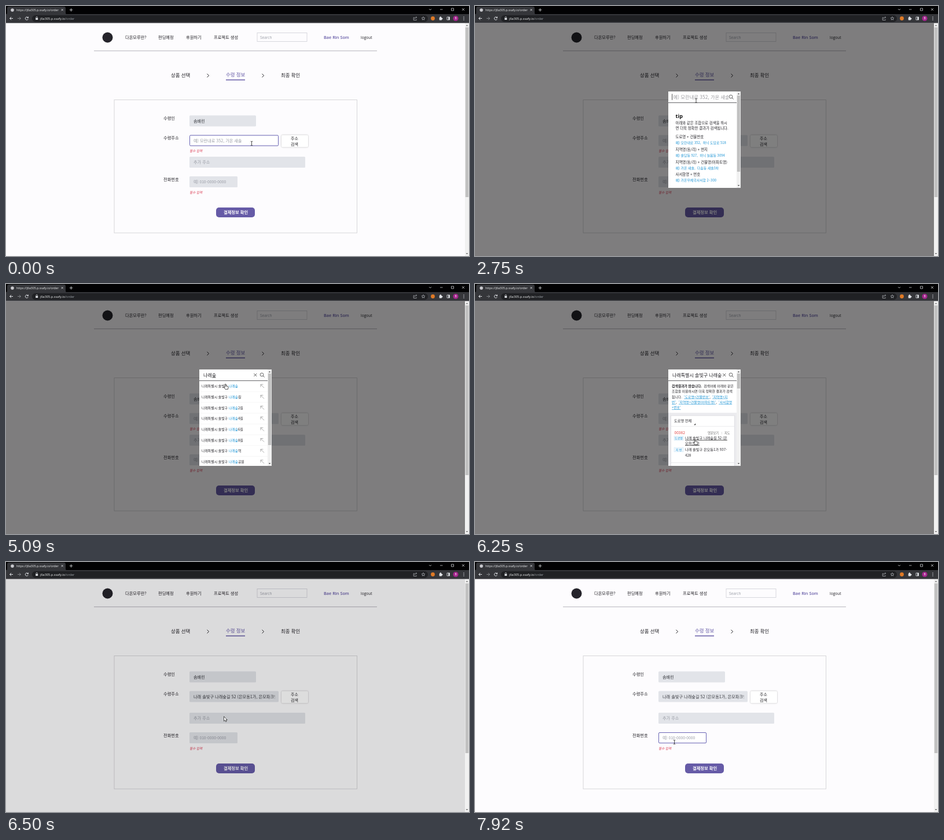
These frames come from a looping animation (800 px wide and 433 px high, 8 s). An HTML page:

```html
<!DOCTYPE html>
<html lang="ko">
<head>
<meta charset="utf-8">
<title>Order form</title>
<style>
html, body { margin: 0; width: 100%; height: 100%; overflow: hidden; background: #fdfcfe; }
svg { display: block; width: 100vw; height: 100vh; }
text { font-family: "Open Sans", "Noto Sans CJK KR", "Noto Sans CJK", sans-serif; white-space: pre; }
.ko { font-family: "Noto Sans CJK KR", "Noto Sans CJK", "Noto Sans", sans-serif; }
</style>
</head>
<body>
<svg id="stage" viewBox="0 0 800 433" preserveAspectRatio="none"></svg>
<script>
const LOOP = 8000;
const PURPLE = '#665ba7', BLUE = '#1a93d4', RED = '#d8324a', HINT = '#9a9da6', INK = '#222126';

// y is the vertical middle of the line
const label = (x, y, s, size, fill, extra, cls) =>
  `<text x="${x}" y="${(y + size * .36).toFixed(2)}" font-size="${size}" fill="${fill}" class="${cls}" ${extra}>${s}</text>`;
const ko = (x, y, s, size = 7.25, fill = INK, extra = '') => label(x, y, s, size, fill, extra, 'ko');
const latin = (x, y, s, size, fill, extra = '') => label(x, y, s, size, fill, extra, '');
const box = (x, y, w, h, fill, extra = '') =>
  `<rect x="${x}" y="${y}" width="${w}" height="${h}" fill="${fill}" ${extra}/>`;
const line = (d, color, w = 1, extra = '') =>
  `<path d="${d}" fill="none" stroke="${color}" stroke-width="${w}" ${extra}/>`;
const dot = (x, y, r, fill) => `<circle cx="${x}" cy="${y}" r="${r}" fill="${fill}"/>`;
const group = (id, content, extra = '') => `<g id="${id}" ${extra}>${content}</g>`;
const field = (y, w) => box(317, y, w, 19, '#e2e4e9', 'rx="1.5"');
const focused = (id, y, w) => group(id, box(317.5, y + .5, w - 1, 18, '#fff', 'rx="1.5" stroke="#6a64b5"'));
const magnifier = (x, y) => dot(x, y, 2.9, 'none').replace('/>', ' stroke="#444" stroke-width=".8"/>') +
  line(`M${x + 2} ${y + 2}l2.6 2.6`, '#444', .9);

function browser() {
  const w = '#dfe1e5';
  return box(0, 0, 800, 14, '#020203') + box(0, 14, 800, 15.5, '#35363a') +
    line('M0 14.5Q2 14 2 12V4Q2 1 5 1H100Q103 1 103 4V12Q103 14 105 14.5Z', 'none').replace('fill="none"', 'fill="#35363a"') +
    dot(11, 7, 2.8, '#c9c9ce') +
    latin(18, 6.8, 'https://j6a305.p.ssafy.io/order', 5.2, '#f1f3f4') +
    line('M95.5 5l3.4 3.4m0-3.4l-3.4 3.4M109.7 6.8h5.6m-2.8-2.8v5.6', w, .8) +
    line('M731 5l2 2 2-2M750 6h4.5M769.5 4h4v4h-4zM788 4l4 4m0-4l-4 4', w, .7) +
    box(45, 16, 684, 11.5, '#202124', 'rx="5.7"') +
    line('M12 21.5H6.5m2.6-2.6l-2.6 2.6 2.6 2.6', w) +
    line('M20 21.5h5.5m-2.6-2.6l2.6 2.6-2.6 2.6', '#818488') +
    line('M38 20a2.6 2.6 0 1 0 .3 2.6M38.4 18.5v2.1h-2.1', w) +
    box(51.2, 20.7, 4, 3.2, w) + line('M52 20.8v-1.2a1.2 1.2 0 0 1 2.4 0v1.2', w, .7) +
    latin(59, 21.5, 'j6a305.p.ssafy.io<tspan fill="#9aa0a6">/order</tspan>', 5.6, '#f1f3f4') +
    line('M706 20h-1.8v4.5h5v-1.5M705.8 22.3q.4-2.6 3.8-2.6m-1.3-1.4l1.5 1.4-1.5 1.4', '#bdc1c6', .7) +
    line('M721 18.6l.9 1.9 2 .2-1.5 1.4.4 2-1.8-1-1.8 1 .4-2-1.5-1.4 2-.2z', '#bdc1c6', .7) +
    dot(737.5, 21.5, 3.4, '#e07a26') +
    box(748.7, 19.8, 4.3, 4.6, w, 'rx=".6"') + dot(750.8, 19.4, 1.2, w) + dot(753.3, 22, 1.2, w) +
    line('M762 19h4.5v5H762z', w, .8) + box(764.3, 19, 2.2, 5, w) +
    dot(777, 21.5, 4.6, '#a3248c') + latin(777, 21.4, 'B', 5, '#fff', 'text-anchor="middle"') +
    [19, 21.5, 24].map(y => dot(791, y, .7, w)).join('');
}

function page() {
  const button = 'rx="2" style="filter:drop-shadow(0 .8px .8px rgba(0,0,0,.3))"';
  return box(0, 29.5, 800, 404, '#fdfcfe') +
    dot(175.5, 54.5, 9, '#25242b') +
    ko(206, 54, '다온모루란?') + ko(263, 54, '펀딩예정') + ko(311, 54, '후원하기') + ko(359, 54, '프로젝트 생성') +
    box(434, 46.5, 86, 15, '#fdfcfe', 'stroke="#cfd0d8" stroke-width=".8"') +
    latin(439, 54.3, 'Search', 6.5, HINT) +
    latin(549, 54, 'Bae Rin Som', 7.3, PURPLE, 'font-weight="600"') + latin(613, 54.3, 'logout', 6.6, INK) +
    line('M152 77.6H641', '#c3c2c8', 1.2) +
    ko(285, 119.7, '상품 선택', 8.4) + ko(380, 119.2, '수령 정보', 8.4, PURPLE) + ko(475, 119.7, '최종 확인', 8.4) +
    line('M380 128H413', PURPLE, 1.5) +
    line('M347.5 117.5l3 3-3 3M442.5 117.5l3 3-3 3', INK, 1) +
    box(187, 162.5, 419.5, 230.5, 'none', 'stroke="#d3d3d6" stroke-width=".9"') +
    ko(272, 194.5, '수령인') + ko(272, 228.5, '수령주소') + ko(272, 300, '전화번호') +
    field(189.5, 115) + ko(324, 199, '솜배린', 7.2, '#35363c') +
    field(223.5, 154) + focused('addressFocus', 223.5, 154) +
    group('addressHint', ko(324, 233, '예) 모란내로 352, 가온 새솔', 7.15, HINT) +
      ko(317, 251, '필수 입력', 5.6, RED, 'font-style="italic"')) +
    group('addressValue', ko(324, 233, '나래 솔빛구 나래숲길 52 (은모동1가, 은모파크빌)', 7.2, '#35363c'), 'clip-path="url(#fieldClip)"') +
    box(476, 223.5, 46, 21, '#fff', button) + ko(492, 229, '주소', 7) + ko(492, 239, '검색', 7) +
    field(261, 200) + ko(324, 270.5, '추가 주소', 7.2, HINT) +
    field(295, 83) + focused('phoneFocus', 295, 83) + ko(324, 304.7, '예) 010-0000-0000', 6.75, HINT) +
    ko(317, 322.5, '필수 입력', 5.6, RED, 'font-style="italic"') +
    box(363, 349, 67, 17, PURPLE, 'rx="5"') + ko(376, 357.5, '결제정보 확인', 7.25, '#fff', 'font-weight="700"');
}

function pageScrollbar() {
  return box(793, 29.5, 7, 404, '#f1f1f1') + box(793.8, 37, 5.4, 294, '#c1c1c1') +
    '<path d="M794.6 34.4l1.9-2 1.9 2zM794.6 428l1.9 2 1.9-2z" fill="#666"/>';
}

function tips() {
  const rows = [
    ['도로명 + 건물번호', '예) 모란내로 352,  하늬 도담로 518'],
    ['지역명(동/리) + 번지', '예) 솔담동 927,  하늬 늘봄동 3094'],
    ['지역명(동/리) + 건물명(아파트명)', '예) 가온 새솔,  다솜동 새솔3차'],
    ['사서함명 + 번호', '예) 가온우체국사서함 2~300']];
  return latin(346.5, 190.5, 'tip', 9, '#111', 'font-weight="700"') +
    ko(346.5, 203, '아래와 같은 조합으로 검색을 하시', 6.4) + ko(346.5, 212, '면 더욱 정확한 결과가 검색됩니다.', 6.4) +
    rows.map(([head, sample], i) => ko(346.5, 227 + i * 21.7, head, 6.45) +
      ko(346.5, 237 + i * 21.7, sample, 5.9, BLUE)).join('');
}

function suggestions(items, match) {
  return items.map((item, i) => {
    const y = 177 + i * 18.7;
    const marked = item.replace(match, `<tspan fill="${BLUE}">${match}</tspan>`);
    return ko(338, y, marked, 5.9) + line(`M334 ${y + 9.3}H452`, '#f0f0f0', .6) +
      line(`M446 ${y + 3}l-6-6m0 4.4v-4.4h4.4`, '#8a8a8a', .7);
  }).join('');
}

function results() {
  const link = s => `<tspan fill="${BLUE}" text-decoration="underline">${s}</tspan>`;
  const tag = (y, s) => box(344, y - 3.8, 16, 7.6, '#eef7fd', 'stroke="#c9e4f5" stroke-width=".5"') +
    ko(352, y, s, 5, BLUE, 'text-anchor="middle"');
  return box(334, 223, 118, 92, '#ececef') + box(338.5, 228, 110, 90, '#fff', 'stroke="#d8d8dc" stroke-width=".7"') +
    ko(340, 177, '<tspan font-weight="700">검색결과가 많습니다.</tspan>  검색어에 아래와 같은', 5.85) +
    ko(340, 186.3, '조합을 이용하시면 더욱 정확한 결과가 검색', 5.85) +
    ko(340, 195.5, `됩니다.  ${link("'도로명+건물번호'")},  ${link("'지역명+지")}`, 5.85) +
    ko(340, 204.8, `${link("번'")},  ${link("'지역명+건물명(아파트명)'")},  ${link("'사서함명")}`, 5.85) +
    ko(340, 214, link("+번호'"), 5.85) +
    ko(344, 237, '도로명 전체', 6.2) + '<path d="M378.3 244.3h2.8v-2.8z" fill="#333"/>' +
    line('M339 246.5H448', '#e6e6e8', .7) +
    ko(344.5, 257.3, '00382', 6.6, '#e0403f') +
    ko(402, 258.3, '영문보기', 5.2, '#666') + line('M426.5 256v4.5', '#ccc', .6) + ko(431, 258.3, '지도', 5.2, '#666') +
    tag(267, '도로명') +
    group('streetLine', ko(363, 267, '나래 솔빛구 나래숲길 52 (은', 6.2) + ko(363, 276, '모파크빌)', 6.2)) +
    tag(287, '지 번') + ko(363, 287, '나래 솔빛구 은모동1가 937-', 6.2) + ko(363, 296.3, '428', 6.2) +
    line('M339 309.5H448', '#e0e0e3', .7);
}

function modal() {
  const town = '나래특별시 도담구';
  const first = ['나래특별시 모루구 새봄동', town,
    ...['가람솔로', '가람솔미래로', '가람로', '거울뫼로', '늘찬동', '다솔동'].map(s => `${town} ${s}`)];
  const second = ['', '길', '2길', '4길', '6길', '8길', '역', '공원'].map(s => `나래특별시 솔빛구 나래숲${s}`);
  return box(334, 148, 125, 167, '#fff') +
    group('tips', tips()) + group('listA', suggestions(first, '나')) +
    group('listB', suggestions(second, '나래숲')) + group('results', results()) +
    line('M334 167.5H452', '#55555a', .9) +
    group('query', ko(341, 157.7, '', 8), 'clip-path="url(#queryClip)"') +
    box(0, 161.7, 7, .6, '#333', 'id="compose"') + box(340, 152.3, .8, 10.5, '#222', 'id="caret"') +
    group('clear', line('M428.3 155l5 5m0-5l-5 5', '#444', .9)) + magnifier(442, 157) +
    box(452, 148, 7, 167, '#f1f1f1') + box(452.8, 155, 5.4, 132, '#c1c1c1', 'id="thumb"') +
    '<path d="M453.7 153l1.8-2 1.8 2zM453.7 310l1.8 2 1.8-2z" fill="#555"/>';
}

const cursors = {
  arrow: '<path d="M0 0V8.2L1.9 6.5 3.2 9.2 4.6 8.6 3.4 6H5.8Z" fill="#fff" stroke="#111" stroke-width=".7"/>',
  beam: line('M-1.7-3.7Q0-3.7 0-2.7Q0-3.7 1.7-3.7M0-3V3M-1.7 3.7Q0 3.7 0 2.7Q0 3.7 1.7 3.7', '#222', .8),
  hand: '<path d="M-1.7-4.5q1.1-1 1.6.2v3l3.4.7q1 .3.8 1.4l-.6 3.5h-4.6l-2.5-3.4q.1-1.2 1.9.1z" fill="#fff" stroke="#111" stroke-width=".7"/>'
};

const stage = document.getElementById('stage');
stage.innerHTML = `<defs><clipPath id="fieldClip">${box(320, 223, 144.5, 20, '#000')}</clipPath>
  <clipPath id="queryClip">${box(336, 149, 102, 17, '#000')}</clipPath>
  <clipPath id="modalClip">${box(334, 148, 125, 167, '#000')}</clipPath></defs>` +
  page() + box(0, 29.5, 793, 404, '#000', 'id="shade"') + pageScrollbar() + browser() +
  group('modal', group('modalBody', modal(), 'clip-path="url(#modalClip)"')) +
  group('cursor', Object.entries(cursors).map(([name, art]) => group(name, art)).join(''));

const el = {};
stage.querySelectorAll('[id]').forEach(node => el[node.id] = node);
const queryText = el.query.firstChild;

const clamp = v => Math.min(1, Math.max(0, v));
const ease = p => p * p * (3 - 2 * p);
const ramp = (t, from, to) => ease(clamp((t - from) / (to - from)));
const show = (name, on) => el[name].setAttribute('display', on ? 'inline' : 'none');
const latest = (steps, t) => steps.filter(s => s[0] <= t).pop();

// time, x, y, shape
const path = [
  [0, 424.5, 238, 'beam'], [1080, 424.5, 238, 'beam'], [1500, 486, 232, 'hand'], [1850, 486, 232, 'hand'],
  [2000, 473, 222.5, 'arrow'], [2420, 420, 196, 'arrow'], [2700, 382, 164, 'beam'], [4900, 382, 164, 'beam'],
  [5080, 380, 178, 'hand'], [5330, 380, 178, 'hand'], [5670, 388, 252, 'arrow'], [5900, 381, 274, 'hand'],
  [6280, 381, 274, 'hand'], [6400, 376.5, 267.5, 'arrow'], [7080, 376.5, 267.5, 'arrow'],
  [7500, 347, 307, 'beam'], [7850, 347, 307, 'beam'], [7920, 344.5, 312, 'beam'], [LOOP, 344.5, 312, 'beam']];

const typing = [[0, ''], [3670, 'ㄴ'], [3750, '나'], [4000, '날'], [4170, '나래'],
  [4590, '나랫'], [4670, '나래수'], [4750, '나래숲'], [5330, '나래특별시 솔빛구 나래숲']];
const views = [[0, 'tips', 132], [3840, 'listA', 124], [4750, 'listB', 124], [5420, 'results', 26]];

function drawCursor(t) {
  const i = Math.max(0, path.findIndex(p => p[0] > t) - 1);
  const [t0, x0, y0, shape] = path[i], [t1, x1, y1] = path[i + 1];
  const p = ramp(t, t0, t1);
  el.cursor.setAttribute('transform', `translate(${x0 + (x1 - x0) * p} ${y0 + (y1 - y0) * p})`);
  Object.keys(cursors).forEach(name => show(name, name === shape));
}

function drawModal(t) {
  const closing = ramp(t, 6290, 6430);
  el.shade.setAttribute('opacity', .5 * ramp(t, 1915, 2350) * (1 - ramp(t, 6270, 6620)));
  el.modal.setAttribute('opacity', ramp(t, 1850, 2045) * (1 - closing));
  el.modal.setAttribute('transform', `translate(0 ${7 * (1 - ramp(t, 1880, 2330)) + 6 * closing})`);
  show('modal', t > 1850 && t < 6430);

  const [, view, thumb] = latest(views, t);
  views.forEach(([, name]) => show(name, name === view));
  el.thumb.setAttribute('height', thumb);
  if (t >= 5830) el.streetLine.setAttribute('text-decoration', 'underline');
  else el.streetLine.removeAttribute('text-decoration');

  const query = latest(typing, t)[1], chars = query.length;
  queryText.textContent = query || '예) 모란내로 352, 가온 새솔';
  queryText.setAttribute('x', query ? 341 : 342.5);
  queryText.setAttribute('font-size', query ? 8 : 8.35);
  queryText.setAttribute('font-weight', query ? 400 : 300);
  queryText.setAttribute('fill', query ? INK : '#9b9b9f');
  show('clear', chars > 0);
  el.caret.setAttribute('x', 340.3 + chars * 7.36);
  show('caret', (t >= 2480 && t < 3250) || (t >= 3670 && t < 5080));
  el.compose.setAttribute('x', 341 + (chars - 1) * 7.36);
  show('compose', chars > 0 && t < 5330);
}

function render(t) {
  const chosen = t >= 6330;
  show('addressFocus', t < 1670);
  show('addressHint', !chosen);
  show('addressValue', chosen);
  show('phoneFocus', t >= 7550);
  drawModal(t);
  drawCursor(t);
}

const start = performance.now();
function tick() {
  render((performance.now() - start) % LOOP);
  requestAnimationFrame(tick);
}
tick();
</script>
</body>
</html>
```
